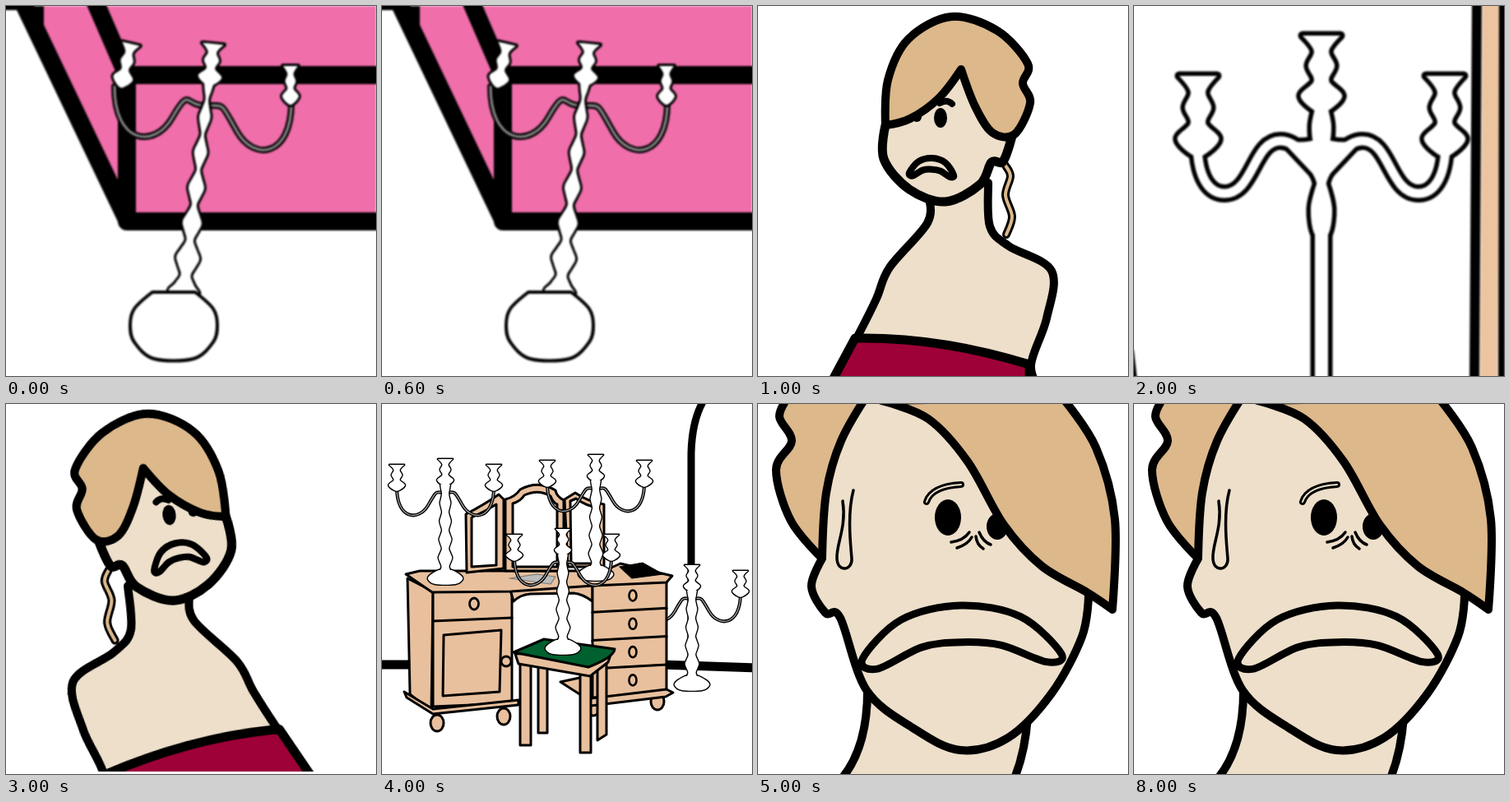
Recreate the animation shown at these times as an HTML page. Size 450x450 px, loop 10 s.

```html
<!DOCTYPE html>
<html lang="en">
<head>
<meta charset="utf-8">
<title>Candlesticks</title>
<style>
html, body { margin: 0; width: 100%; height: 100%; overflow: hidden; background: #fff; }
svg { display: block; width: 100vw; height: 100vh; }
path, ellipse { stroke-linecap: round; stroke-linejoin: round; }
</style>
</head>
<body>
<svg id="stage" viewBox="0 0 450 450"></svg>
<script>
const NS = 'http://www.w3.org/2000/svg';
const SKIN = '#eddfca', HAIR = '#dcb88b', DRESS = '#9e0038', PINK = '#f06eaa',
      WOOD = '#e8c09d', GREEN = '#00602f', WHITE = '#fff', BLACK = '#000', NONE = 'none';
let layer = document.getElementById('stage');

function add(tag, attrs) {
  const el = document.createElementNS(NS, tag);
  for (const key in attrs) el.setAttribute(key, attrs[key]);
  return layer.appendChild(el);
}

function group(attrs, paint) {
  const parent = layer;
  const made = layer = add('g', attrs);
  paint();
  layer = parent;
  return made;
}

const draw = (d, fill = NONE, width = 0, stroke = BLACK) =>
  add('path', { d, fill, stroke: width ? stroke : NONE, 'stroke-width': width });
const oval = (cx, cy, rx, ry, fill = BLACK, width = 0) =>
  add('ellipse', { cx, cy, rx, ry, fill, stroke: width ? BLACK : NONE, 'stroke-width': width });

function tube(d, outer, inner, core) {
  draw(d, NONE, outer);
  draw(d, NONE, inner, core);
}

// Smooth path through [x, y, sharp] points.
function curve(pts, closed) {
  const n = pts.length;
  const at = i => closed ? pts[(i + n) % n] : pts[Math.max(0, Math.min(n - 1, i))];
  const handle = (i, side) => {
    const k = at(i)[2] ? 0 : side / 6;
    return [0, 1].map(a => at(i)[a] + (at(i + 1)[a] - at(i - 1)[a]) * k);
  };
  let d = `M${pts[0][0]} ${pts[0][1]}`;
  for (let i = 0; i < (closed ? n : n - 1); i++)
    d += `C${[...handle(i, 1), ...handle(i + 1, -1), at(i + 1)[0], at(i + 1)[1]]}`;
  return closed ? d + 'Z' : d;
}

// "x,y" marks a smooth point and "x,y!" a corner.
const parse = text => text.split(/\s+/).map(t => [...t.split(',').map(parseFloat), t.endsWith('!')]);
const open = (text, fill, width) => draw(curve(parse(text), false), fill, width);
const loop = (text, fill, width) => draw(curve(parse(text), true), fill, width);

// Turned shape: radii spread evenly along an axis.
function lathe(x0, y0, x1, y1, radii) {
  const dx = x1 - x0, dy = y1 - y0, length = Math.hypot(dx, dy);
  const edge = side => radii.map((r, i) => {
    const t = i / (radii.length - 1), out = side * r / length;
    return [x0 + dx * t + out * dy, y0 + dy * t - out * dx, i === 0];
  });
  return curve([...edge(1), ...edge(-1).reverse()], true);
}

const cup = (x, y, radius, height, lean = 0) =>
  lathe(x, y, x + lean, y + height, [1, .4, .7, .4, 1.1, .3].map(r => r * radius));

function baluster(x0, y0, x1, y1, top, foot, ripple, bulges) {
  const steps = bulges * 4;
  return lathe(x0, y0, x1, y1, Array.from({ length: steps + 1 }, (_, i) => {
    const t = i / steps;
    return top + (foot - top) * t * t + ripple * (.4 + .6 * t) * Math.cos(2 * Math.PI * bulges * t);
  }));
}

// Arm hanging from a cup and swinging up to the hub.
function arm(x, y, hubX, hubY) {
  const dx = hubX - x, sag = Math.abs(dx);
  return `M${x} ${y}C${x} ${y + .65 * sag} ${x + .45 * dx} ${y + .7 * sag} ${x + .65 * dx} ${y + .35 * sag}
    S${hubX - .2 * dx} ${hubY} ${hubX} ${hubY}`;
}

// White shapes sharing one outer outline.
function merged(line, bodies, arms = [], core = 0) {
  for (const [color, extra] of [[BLACK, 2 * line], [WHITE, 0]]) {
    for (const d of arms) draw(d, NONE, core + extra, color);
    for (const d of bodies) draw(d, color, extra, color);
  }
}

function frown(x, y, w, h, tilt, width) {
  const top = [[-1, 0], [-.6, -.75], [0, -1], [.6, -.75], [1, 0]];
  const bottom = [[.85, .15], [.4, -.2], [0, -.28], [-.4, -.2], [-.85, .2]];
  group({ transform: `translate(${x} ${y}) rotate(${tilt})` }, () =>
    draw(curve([...top, ...bottom].map(([u, v]) => [u * w, v * h]), true), SKIN, width));
}

function pinkRoom() {
  draw('M25 0H450V260H147Z', PINK);
  draw('M20 0H46V29L32 32Z', BLACK);
  draw('M-10 -6H20L148 262H460M108 -6L147 84H460M147 84V262', NONE, 22);
  tube(arm(132, 98, 240, 121), 8, 3, '#888');
  tube(arm(347, 118, 246, 121), 8, 3, '#888');
  merged(3, [cup(152, 46, 11, 52, -12), cup(346, 73, 9, 46), cup(252, 46, 13, 50, -5),
    baluster(247, 92, 216, 349, 4, 12, 5, 6)]);
  draw(lathe(204, 348, 204, 429, [26, 48, 53, 48, 24]), WHITE, 4);
}

function woman(mouth) {
  open(`208,232 206,264 160,318 144,356 122,400 84,470! 345,470! 332,437 351,380 357,322
    305,292 282,268 280,215`, SKIN, 10);
  draw('M118 404Q220 402 330 436V475H80Z', DRESS, 11);
  tube(curve(parse('301,194 307,207 301,230 309,256 302,278')), 10, 4, HAIR);
  loop(`155,145! 153,186 184,223 228,238 270,217 284,190 298,189 309,158! 247,70!`, SKIN, 11);
  loop(`155,145! 158,90 183,40 235,13 291,30 328,70 322,94 331,118 312,156 285,154 264,122
    247,77! 220,112 185,137`, HAIR, 10);
  oval(222, 136, 8, 12);
  oval(193, 135, 6, 6);
  draw('M221 118Q230 113 236 119', NONE, 8);
  frown(...mouth, 8);
}

const womanFacingLeft = () => woman([211, 204, 27, 19, 3]);

function womanFacingRight() {
  group({ transform: 'translate(409 -26.4) rotate(-6) scale(-1.019 1.019)' },
    () => woman([215, 195, 32, 25, 8]));
  draw('M0 447H450V460H0Z', WHITE);
}

function largeCandlestick() {
  const axis = 228;
  const branch = side => {
    const x = n => axis + side * n;
    return `M${x(-151)} 170C${x(-150)} 210 ${x(-136)} 228 ${x(-118)} 228
      C${x(-83)} 228 ${x(-83)} 164 ${x(-50)} 164C${x(-28)} 164 ${x(-6)} 195 ${axis} 215`;
  };
  merged(5.5, [
    ...[-150, 150].map(dx => cup(axis + dx, 85, 23, 96)),
    cup(axis, 36, 23, 92),
    lathe(axis, 122, axis, 170, [7, 12, 8]),
    lathe(axis, 214, axis, 278, [5, 13, 8]),
    `M178 162Q205 170 ${axis} 160Q251 170 278 162L${axis} 215Z`,
    'M220 270H236V470H220Z'
  ], [branch(1), branch(-1)], 11);
  draw('M424 -5H445L442 455H421Z', '#ecc5a0');
  draw('M417 -5L414 455', NONE, 12);
  draw('M448 -5L447 455', NONE, 8);
  draw('M-3 420L1 455', NONE, 6);
}

function candlestick(x, y) {
  group({ transform: `translate(${x} ${y})` }, () => {
    const span = [-59, 59];
    for (const side of span) tube(arm(side, 36, 0, 42), 4, 1.2, '#aaa');
    merged(1.4, [
      ...span.map(side => cup(side, 8, 9, 31)),
      cup(0, 1, 9, 32),
      baluster(0, 32, 0, 143, 5, 7, 2.2, 5),
      lathe(0, 136, 0, 153, [8, 18, 21, 12])
    ]);
  });
}

// Wooden panel with upright sides and a sloping top.
const wood = (d, fill = WOOD) => draw(d, fill, 3);
const panel = (x0, y0, x1, y1, height, fill) =>
  wood(`M${x0} ${y0}L${x1} ${y1}v${height}L${x0} ${y0 + height}Z`, fill);

function dressingTable() {
  draw('M391 -4Q377 20 376 60V315', NONE, 9);
  draw('M-5 317H36M340 317L455 321', NONE, 11);
  candlestick(377, 195);

  for (const [x, y] of [[67, 388], [148, 380], [257, 369], [335, 362]]) oval(x, y, 8, 10, WOOD, 3);
  wood('M217 338L240 333L256 350V363Z');
  wood('M31 212L62 228L60 374L34 353Z');
  panel(62, 228, 158, 224, 140);
  wood('M27 350L62 371L166 360V366L62 377L30 357Z');
  draw('M62 264L158 260M75 281L145 275L143 350L74 355Z', NONE, 3);
  wood('M156 226L256 220V240Q244 231 233 230L180 231Q168 232 160 240Z');
  for (let row = 0; row < 4; row++) {
    const y = 219 + 34.3 * row;
    panel(256, y, 346, y - 5, 35);
    oval(305, y + 14, 4.5, 6.5, WOOD, 2.6);
  }
  wood('M246 359L346 347L354 351L345 356L254 367Z');
  wood('M29 207L46 203H270L290 194L353 209L346 217L256 221L157 228L61 229Z');
  oval(112, 243, 5.5, 7, WOOD, 2.8);
  oval(151, 313, 6, 6, WOOD, 2.8);

  wood('M102 134Q125 122 142 110L148 116V200L103 205Z');
  wood('M109 138Q125 131 139 122V196L109 198Z', WHITE);
  wood('M222 116L235 108Q251 119 270 122V198H226Z');
  wood('M229 118L236 115Q248 124 263 126V194H230Z', WHITE);
  wood('M150 203V116Q162 113 168 104Q190 92 211 105Q212 112 221 117V203Z');
  wood('M159 198V121Q169 118 173 111Q190 103 205 112Q208 120 213 122V198Z', WHITE);
  draw('M155 212L188 207L211 210L205 219Z', '#bbb', 1.2, '#777');
  draw('M289 198L317 193L342 207L304 212Z', BLACK, 1);
  candlestick(77, 66);
  candlestick(260, 61);

  panel(190, 315, 201, 315, 85);
  panel(262, 314, 273, 307, 95);
  panel(168, 311, 181, 311, 104);
  panel(241, 324, 254, 324, 100);
  wood('M162 304L280 299L275 314L253 331L166 316Z');
  wood('M160 302L197 286L283 298Q282 308 251 320Z', GREEN);
  candlestick(220, 151);
}

function worriedCloseUp() {
  draw('M133 340Q135 420 98 460H310Q325 425 328 380Z', SKIN, 10);
  loop('39,-12! 26,15 41,45 22,80 40,142 78,188! 140,188! 150,-12!', HAIR, 10);
  loop(`135,-14! 101,45 83,108 78,188! 65,222 82,254 100,260 132,348 190,395 246,421
    304,406 357,352 394,283 402,233! 330,-20!`, SKIN, 10);
  oval(231, 138, 16, 22);
  oval(291, 149, 13, 16);
  loop(`150,-4! 207,18 255,70 299,147 345,197 400,229 431,250! 434,140 411,53 370,-8!`, HAIR, 10);
  tube('M205 119Q211 100 247 98', 8, 2, SKIN);
  draw('M103 118C108 150 95 170 96 188S115 202 114 188S108 135 116 105', NONE, 3.5);
  draw('M235 168Q250 166 257 156M242 175Q255 171 260 162M265 161Q266 171 274 176M269 156Q274 168 283 171', NONE, 3.5);
  frown(248, 307, 121, 62, -1.5, 9);
}

const LOOP = 10000;
const scenes = [
  [pinkRoom, .8], [womanFacingLeft, .7], [largeCandlestick, .8],
  [womanFacingRight, .7], [dressingTable, 0], [worriedCloseUp, .5]
].map(([paint, blur], i) => ({
  start: i * 1000,
  node: group(blur ? { filter: `blur(${blur}px)` } : {}, paint)
}));

const began = performance.now();
function show() {
  const time = Math.max(0, performance.now() - began) % LOOP;
  const current = scenes.findLast(scene => scene.start <= time);
  for (const scene of scenes) scene.node.style.display = scene === current ? '' : 'none';
  requestAnimationFrame(show);
}
show();
</script>
</body>
</html>
```
